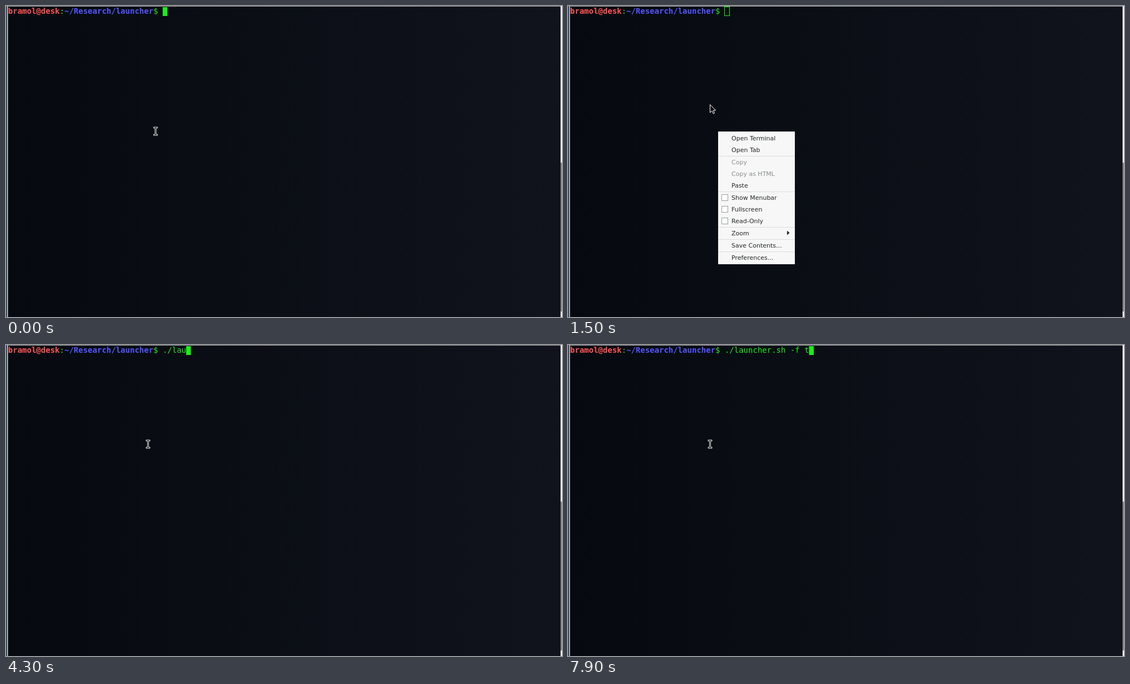
An HTML page for the animation above (8000 ms loop, 1000 by 560 pixels).

```html
<!DOCTYPE html>
<html lang="en">
<head>
<meta charset="utf-8">
<title>Terminal</title>
<style>
html, body { margin: 0; width: 100%; height: 100%; overflow: hidden; background: #0a0e14; }
svg { display: block; width: 1000px; height: 560px; }
text { white-space: pre; }
.term { font: 14px "DejaVu Sans Mono", monospace; fill: #18f018; }
.user { font-weight: bold; fill: #ff5555; }
.path { font-weight: bold; fill: #5555ff; }
#menu { font: 11px "DejaVu Sans", sans-serif; fill: #232627; }
#menu .off { fill: #8b8d8e; }
#menu .hot { fill: #fff; }
</style>
</head>
<body>
<svg viewBox="0 0 1000 560">
  <defs>
    <linearGradient id="bg">
      <stop offset="0" stop-color="#060a10"/>
      <stop offset="1" stop-color="#10131b"/>
    </linearGradient>
  </defs>
  <rect width="1000" height="560" fill="url(#bg)"/>
  <rect width="1000" height="1" fill="#a4a7aa"/>
  <rect width="2" height="560" fill="#34425c"/>
  <rect x="2" width="1.5" height="560" fill="#d4d6d8"/>
  <rect x="997.5" width="2.5" height="282" fill="#f2f2f2"/>
  <rect x="997.5" y="282" width="2.5" height="268" fill="#8c8c8c"/>
  <rect x="997.5" y="550" width="2.5" height="10" fill="#f2f2f2"/>

  <text class="term" x="3.8" y="14"><tspan class="user">bramol@desk</tspan>:<tspan class="path">~/Research/launcher</tspan>$</text>
  <text class="term" id="typed" x="281.9" y="14"></text>
  <rect id="block" y="2" width="8.4" height="16" fill="#18f018"/>
  <rect id="hollow" x="281.5" y="1.5" width="9" height="16" fill="none" stroke="#18f018"/>

  <g id="menu">
    <rect x="270" y="226" width="138" height="239" fill="#f7f7f7"/>
    <rect id="glow" x="270" width="138" height="21" fill="#1b8fd0"/>
  </g>
  <path id="arrow" d="M0 0V14.5L3.4 11.4L5.8 16.4L8 15.4L5.7 10.5H10Z" fill="#0b0b0b" stroke="#fff"/>
  <path id="beam" d="M-3.5-7.5H3.5V-5.5H1V5.5H3.5V7.5H-3.5V5.5H-1V-5.5H-3.5Z" fill="#0b0b0b" stroke="#e8e8e8"/>
</svg>
<script>
const $ = id => document.getElementById(id);
const menu = $('menu');

function add(tag, attrs, content = '') {
  const el = document.createElementNS('http://www.w3.org/2000/svg', tag);
  for (const key in attrs) el.setAttribute(key, attrs[key]);
  el.textContent = content;
  return menu.appendChild(el);
}

// label, row centre, kind
const items = [
  ['Open Terminal', 238], ['Open Tab', 259],
  ['Copy', 281, 'off'], ['Copy as HTML', 302, 'off'], ['Paste', 323],
  ['Show Menubar', 345, 'check'], ['Fullscreen', 366, 'check'], ['Read-Only', 387, 'check'],
  ['Zoom', 409], ['Save Contents...', 431], ['Preferences...', 453]
].map(([label, y, kind]) => {
  if (kind === 'check')
    add('rect', { x: 276.5, y: y - 5.5, width: 11, height: 11, fill: '#fff', stroke: '#9a9c9e' });
  const el = add('text', { x: 294, y: y + 4, class: kind || '' }, label);
  return { el, y, enabled: kind !== 'off' };
});
for (const y of [270, 334, 398, 420, 442])
  add('rect', { x: 270, y, width: 138, height: 1, fill: '#dcdcdc' });
add('path', { d: 'M394 404.5L398.5 408.5L394 412.5Z' });

const command = './launcher.sh -f t';
// time, characters shown
const typing = [[0, 0], [2600, 1], [2800, 2], [4000, 3], [4100, 4], [4300, 5],
  [4400, 14], [6000, 15], [7300, 16], [7400, 17], [7900, 18]];
// time, pointer tip
const moves = [[200, 268.5, 224.5], [400, 273, 231], [500, 287, 256], [600, 301, 285],
  [700, 311, 308], [800, 315, 317.5], [1300, 306, 296], [1400, 276, 226], [1500, 255.5, 177.5]];

const latest = (steps, t) => steps.findLast(step => step[0] <= t);
const show = (el, on) => el.setAttribute('visibility', on ? 'visible' : 'hidden');
const place = (el, x, y) => el.setAttribute('transform', `translate(${x} ${y})`);

function draw(t) {
  const open = t >= 200 && t < 1700;
  const count = latest(typing, t)[1];
  $('typed').textContent = command.slice(0, count);
  $('block').setAttribute('x', 281.9 + count * 8.428);
  show($('block'), !open);
  show($('hollow'), open);
  show(menu, open);
  show($('arrow'), open);
  show($('beam'), !open);
  place($('beam'), ...(t < 200 ? [269, 225.5] : [255.5, 178.5]));

  let hot;
  if (open) {
    const [time, x, y] = latest(moves, t);
    place($('arrow'), x, y);
    if (time > 200 && x >= 270)
      hot = items.find(item => item.enabled && Math.abs(y - item.y) <= 10.5);
  }
  for (const item of items) item.el.classList.toggle('hot', item === hot);
  show($('glow'), hot);
  if (hot) $('glow').setAttribute('y', hot.y - 10);
}

const start = performance.now();
function tick() {
  draw((performance.now() - start) % 8000);
  requestAnimationFrame(tick);
}
tick();
</script>
</body>
</html>
```
